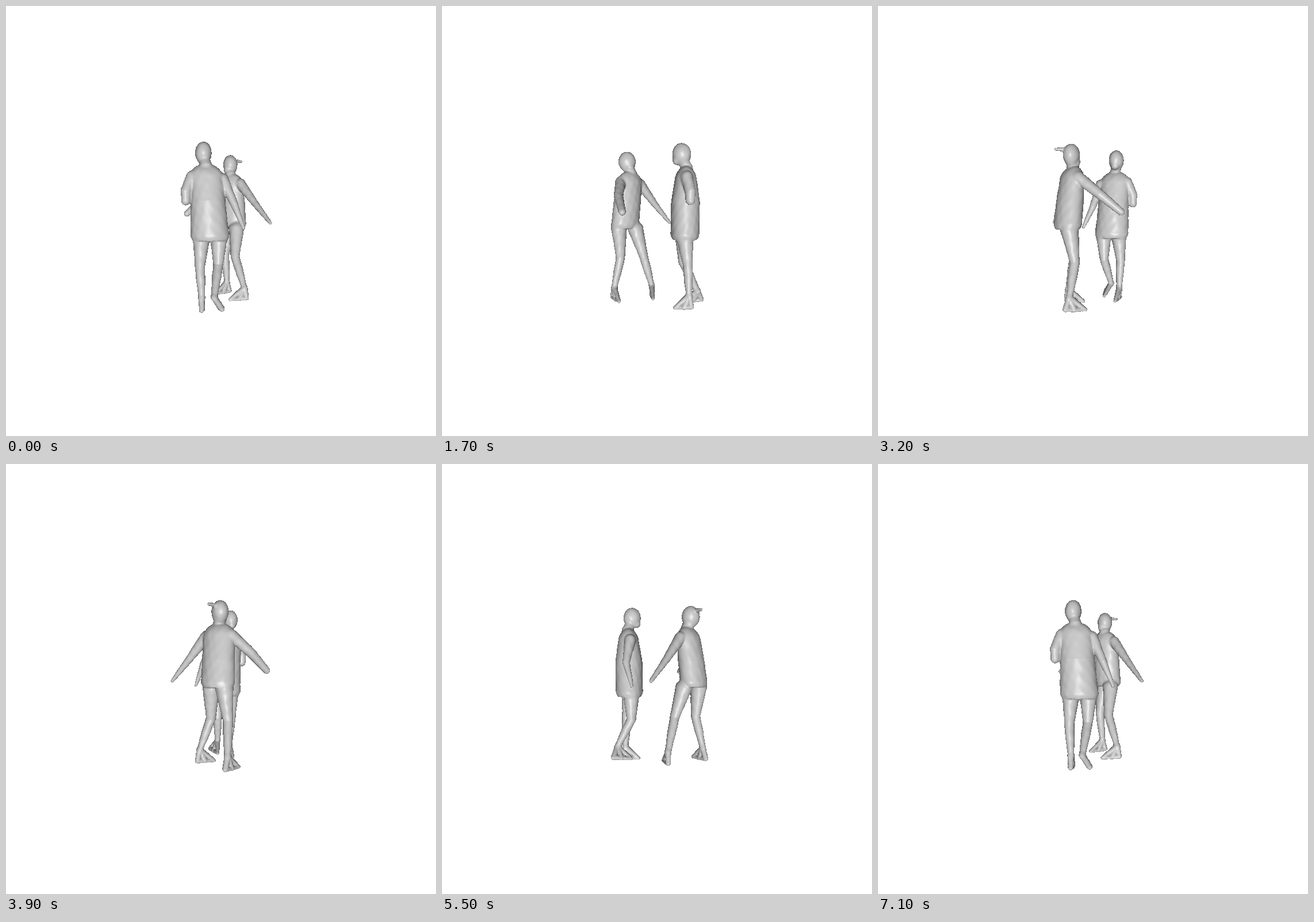
An HTML page with a canvas for the animation above (7200 ms loop, 748 by 748 pixels).

```html
<!DOCTYPE html>
<html lang="en">
<head>
<meta charset="utf-8">
<title>Turntable</title>
<style>
  html, body { margin: 0; width: 100%; height: 100%; overflow: hidden; background: #fff; }
  canvas { display: block; }
</style>
</head>
<body>
<canvas id="stage" width="748" height="748"></canvas>
<script>
const CENTER = 374, CAMERA = 640, FRAME_MS = 100, FRAMES = 72;
const VIEW = { x: 270, y: 222, w: 210, h: 326 };
const CELL = 1.6, ORIGIN = [-82, -152, -106], SIZE = [116, 180, 126];
const [NX, NY, NZ] = SIZE;
const FAR = 6, BLEND = 3;
const field = new Float32Array(NX * NY * NZ).fill(FAR);

const lerp = (a, b, t) => a + t * (b - a);
const mix = (p, q, t) => p.map((v, i) => lerp(v, q[i], t));

// ---- Distance field -------------------------------------------------

function smoothMin(a, b) {
  const h = Math.max(BLEND - Math.abs(a - b), 0) / BLEND;
  return Math.min(a, b) - h * h * BLEND / 4;
}

function stamp(lo, hi, distance) {
  const from = lo.map((v, i) => Math.max(0, Math.floor((v - FAR - ORIGIN[i]) / CELL)));
  const to = hi.map((v, i) => Math.min(SIZE[i] - 1, Math.ceil((v + FAR - ORIGIN[i]) / CELL)));
  for (let k = from[2]; k <= to[2]; k++)
    for (let j = from[1]; j <= to[1]; j++)
      for (let i = from[0]; i <= to[0]; i++) {
        const n = i + NX * (j + NY * k);
        const d = distance(ORIGIN[0] + i * CELL, ORIGIN[1] + j * CELL, ORIGIN[2] + k * CELL);
        field[n] = smoothMin(field[n], d);
      }
}

// Chain of capsules whose radius varies from joint to joint.
function limb(joints, radii) {
  const bound = (pick, sign) => [0, 1, 2].map(i => pick(...joints.map((p, n) => p[i] + sign * radii[n])));
  stamp(bound(Math.min, -1), bound(Math.max, 1), (x, y, z) => {
    let best = 1e3;
    for (let i = 1; i < joints.length; i++) {
      const a = joints[i - 1], b = joints[i];
      const ux = b[0] - a[0], uy = b[1] - a[1], uz = b[2] - a[2];
      const px = x - a[0], py = y - a[1], pz = z - a[2];
      const t = Math.min(1, Math.max(0, (px * ux + py * uy + pz * uz) / (ux * ux + uy * uy + uz * uz)));
      const d = Math.hypot(px - t * ux, py - t * uy, pz - t * uz) - lerp(radii[i - 1], radii[i], t);
      if (d < best) best = d;
    }
    return best;
  });
}

function ellipsoid([cx, cy, cz], [rx, ry, rz]) {
  stamp([cx - rx, cy - ry, cz - rz], [cx + rx, cy + ry, cz + rz], (x, y, z) => {
    const a = (x - cx) / rx, b = (y - cy) / ry, c = (z - cz) / rz;
    const k = Math.hypot(a, b, c);
    return k * (k - 1) / (Math.hypot(a / rx, b / ry, c / rz) + 1e-6);
  });
}

// Elliptic column: domed shoulders, widening to the hips, tucked in at the hem.
function torso({ yaw, collar, hem, width, girth }) {
  const co = Math.cos(yaw), si = Math.sin(yaw);
  const reach = width[1] + 8;
  const lo = collar.map((v, i) => Math.min(v, hem[i]) - (i === 1 ? 0 : reach));
  const hi = collar.map((v, i) => Math.max(v, hem[i]) + (i === 1 ? 0 : reach));
  stamp(lo, hi, (x, y, z) => {
    const yc = Math.min(collar[1] - 1, Math.max(hem[1], y));
    const drop = collar[1] - yc, t = drop / (collar[1] - hem[1]);
    const dome = Math.sqrt(1 - (1 - Math.min(1, drop / 22)) ** 2);
    const tuck = 1 - 0.16 * Math.max(0, 1 - (yc - hem[1]) / 10) ** 2;
    const rs = lerp(width[0], width[1], t * t) * dome * tuck;
    const rd = lerp(girth[0], girth[1], Math.min(1, drop / 60)) * dome * tuck;
    const dx = x - lerp(collar[0], hem[0], t), dz = z - lerp(collar[2], hem[2], t);
    const u = (dx * co + dz * si) / rs, v = (dz * co - dx * si) / rd;
    const k = Math.hypot(u, v);
    const radial = k * (k - 1) / (Math.hypot(u / rs, v / rd) + 1e-6);
    return Math.max(radial, y - collar[1], hem[1] - y);
  });
}

function head({ yaw, skull, collar }) {
  const ahead = (d, rise) => [skull[0] - Math.sin(yaw) * d, skull[1] + rise, skull[2] + Math.cos(yaw) * d];
  ellipsoid(skull, [13.5, 18, 15.5]);
  limb([ahead(3, -6), ahead(8, -11)], [9, 7]);
  limb([ahead(-1, -8), mix(collar, skull, -0.2)], [8.5, 10]);
}

function arm({ joints, tip }) {
  limb(joints, joints.map((_, i) => lerp(9.5, tip, i / (joints.length - 1))));
}

function leg({ hip, knee, ankle, heel, toe }) {
  const calf = mix(knee, ankle, 0.4), sole = mix(heel, toe, 0.45);
  limb([hip, knee, calf, ankle], [14, 8, 7.5, 5]);
  limb([ankle, heel, toe, ankle, sole], [5, 4.5, 3, 5, 4.5]);
}

function figure(body) {
  torso(body);
  head(body);
  body.arms.forEach(arm);
  body.legs.forEach(leg);
}

function roughen() {
  let n = 0;
  for (let k = 0; k < NZ; k++)
    for (let j = 0; j < NY; j++)
      for (let i = 0; i < NX; i++, n++)
        if (field[n] < FAR)
          field[n] += 0.35 * Math.sin(i * 0.42 + j * 0.13) * Math.sin(j * 0.37 - k * 0.2) * Math.sin(k * 0.45 + i * 0.17);
}

const first = {
  yaw: Math.PI, skull: [-29, 111, 43], collar: [-25, 92, 50], hem: [-18, -31, 48],
  width: [27, 32], girth: [15, 24],
  arms: [
    { joints: [[-47, 71, 51], [-56, 48, 57], [-56, 33, 57]], tip: 7.5 },
    { joints: [[2, 68, 47], [20, 29, 54], [36, -11, 45]], tip: 3 }
  ],
  legs: [
    { hip: [-32, -26, 48], knee: [-34, -72, 53], ankle: [-31, -122, 55], heel: [-31, -140, 59], toe: [-30, -143, 31] },
    { hip: [-4, -28, 45], knee: [-5, -70, 45], ankle: [-11, -118, 69], heel: [1, -134, 76], toe: [-5, -138, 45] }
  ]
};

const second = {
  yaw: 0.69, skull: [17, 107, -56], collar: [17, 90, -50], hem: [22, -13, -61],
  width: [26, 28], girth: [16, 21],
  arms: [
    { joints: [[35, 69, -35], [58, 34, -11], [83, -3, 17]], tip: 3 },
    { joints: [[1, 69, -65], [-33, 42, -62], [-64, 15, -50]], tip: 6 }
  ],
  legs: [
    { hip: [28, -14, -42], knee: [25, -64, -27], ankle: [41, -118, -14], heel: [45, -136, -14], toe: [15, -138, -9] },
    { hip: [14, -14, -70], knee: [7, -64, -66], ankle: [11, -118, -78], heel: [16, -136, -82], toe: [-11, -138, -65] }
  ]
};

// ---- Surface --------------------------------------------------------

function buildMesh() {
  const stride = [1, NX, NX * NY];
  const offsets = Array.from({ length: 8 }, (_, c) => (c & 1) + (c >> 1 & 1) * NX + (c >> 2) * NX * NY);
  const cellVertex = new Int32Array(field.length).fill(-1);
  const points = [], normals = [], triangles = [], cells = [];

  for (let k = 0; k < NZ - 1; k++)
    for (let j = 0; j < NY - 1; j++)
      for (let i = 0; i < NX - 1; i++) {
        const n = i + NX * (j + NY * k);
        let inside = 0;
        for (let c = 0; c < 8; c++) if (field[n + offsets[c]] < 0) inside++;
        if (inside === 0 || inside === 8) continue;
        const sum = [0, 0, 0], slope = [0, 0, 0];
        let crossings = 0;
        for (let c = 0; c < 8; c++)
          for (let axis = 0; axis < 3; axis++) {
            const bit = 1 << axis;
            if (c & bit) continue;
            const a = field[n + offsets[c]], b = field[n + offsets[c | bit]];
            slope[axis] += b - a;
            if ((a < 0) === (b < 0)) continue;
            for (let m = 0; m < 3; m++) sum[m] += c >> m & 1;
            sum[axis] += a / (a - b);
            crossings++;
          }
        const length = Math.hypot(...slope) || 1;
        cellVertex[n] = cells.length;
        cells.push(n);
        [i, j, k].forEach((g, m) => {
          points.push(ORIGIN[m] + (g + sum[m] / crossings) * CELL);
          normals.push(slope[m] / length);
        });
      }

  for (const n of cells)
    for (let axis = 0; axis < 3; axis++) {
      if ((field[n] < 0) === (field[n + stride[axis]] < 0)) continue;
      const u = stride[(axis + 1) % 3], v = stride[(axis + 2) % 3];
      const [a, b, c, d] = [n, n - u, n - u - v, n - v].map(q => cellVertex[q]);
      if (Math.min(a, b, c, d) >= 0) triangles.push(a, b, c, a, c, d);
    }
  return {
    points: Float32Array.from(points),
    normals: Float32Array.from(normals),
    triangles: Int32Array.from(triangles)
  };
}

// ---- Rendering ------------------------------------------------------

figure(first);
figure(second);
limb([[27, 115, -63], [39, 115, -70]], [3.5, 2.3]); // ponytail
roughen();

const mesh = buildMesh();
const count = mesh.points.length / 3;
const sx = new Float32Array(count), sy = new Float32Array(count);
const depth = new Float32Array(count), tone = new Float32Array(count);
const zBuffer = new Float32Array(VIEW.w * VIEW.h);
const ctx = document.getElementById("stage").getContext("2d");
const image = ctx.createImageData(VIEW.w, VIEW.h);
const pixels = new Uint32Array(image.data.buffer);

function shade(ny, nz) {
  const light = Math.max(0, nz * 0.99 - ny * 0.13);
  return Math.min(250, 60 + 146 * Math.pow(light, 0.85) + 42 * Math.pow(light, 80));
}

function transform(angle) {
  const co = Math.cos(angle), si = Math.sin(angle);
  const { points: p, normals: q } = mesh;
  for (let v = 0, n = 0; v < count; v++, n += 3) {
    const z = p[n + 2] * co - p[n] * si;
    const scale = CAMERA / (CAMERA - z);
    sx[v] = CENTER - VIEW.x + (p[n] * co + p[n + 2] * si) * scale;
    sy[v] = CENTER - VIEW.y - p[n + 1] * scale;
    depth[v] = z;
    tone[v] = shade(q[n + 1], q[n + 2] * co - q[n] * si);
  }
}

function fillTriangle(a, b, c) {
  const ax = sx[a], ay = sy[a], bx = sx[b], by = sy[b], cx = sx[c], cy = sy[c];
  const area = (bx - ax) * (cy - ay) - (by - ay) * (cx - ax);
  if (Math.abs(area) < 1e-6) return;
  const x0 = Math.max(0, Math.ceil(Math.min(ax, bx, cx))), x1 = Math.min(VIEW.w - 1, Math.floor(Math.max(ax, bx, cx)));
  const y0 = Math.max(0, Math.ceil(Math.min(ay, by, cy))), y1 = Math.min(VIEW.h - 1, Math.floor(Math.max(ay, by, cy)));
  for (let y = y0; y <= y1; y++)
    for (let x = x0; x <= x1; x++) {
      const wb = ((x - ax) * (cy - ay) - (y - ay) * (cx - ax)) / area;
      const wc = ((bx - ax) * (y - ay) - (by - ay) * (x - ax)) / area;
      const wa = 1 - wb - wc;
      if (wa < -1e-4 || wb < -1e-4 || wc < -1e-4) continue;
      const z = wa * depth[a] + wb * depth[b] + wc * depth[c];
      const n = x + y * VIEW.w;
      if (z <= zBuffer[n]) continue;
      zBuffer[n] = z;
      const g = wa * tone[a] + wb * tone[b] + wc * tone[c] | 0;
      pixels[n] = (0xff000000 | g << 16 | g << 8 | g) >>> 0;
    }
}

function render(frame) {
  transform(frame / FRAMES * 2 * Math.PI);
  zBuffer.fill(-1e4);
  pixels.fill(0xffffffff);
  const t = mesh.triangles;
  for (let i = 0; i < t.length; i += 3) fillTriangle(t[i], t[i + 1], t[i + 2]);
  ctx.putImageData(image, VIEW.x, VIEW.y);
}

ctx.fillStyle = "#fff";
ctx.fillRect(0, 0, 748, 748);
let shown = -1;
function tick(now) {
  const frame = Math.floor(now / FRAME_MS) % FRAMES;
  if (frame !== shown) render(shown = frame);
  requestAnimationFrame(tick);
}
requestAnimationFrame(tick);
</script>
</body>
</html>
```
